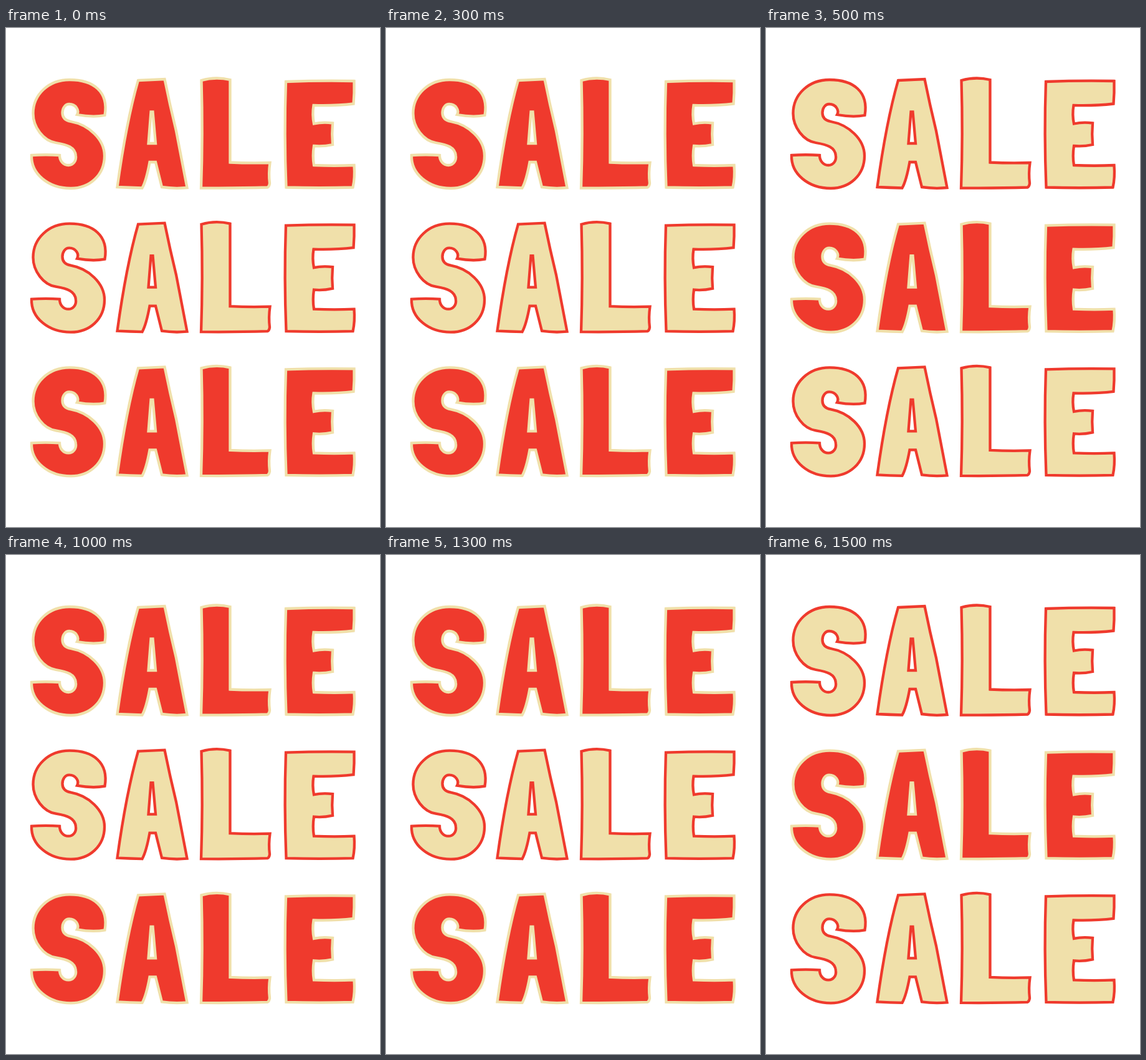
Write an HTML page with a canvas that moves like this. It is 600 px wide and 800 px high and loops after 2 s.

```html
<!DOCTYPE html>
<html lang="en">
<head>
<meta charset="utf-8">
<title>Sale</title>
<style>
  html, body { margin: 0; width: 100%; height: 100%; overflow: hidden; background: #fff; }
  canvas { display: block; }
</style>
</head>
<body>
<canvas id="stage" width="600" height="800" aria-label="SALE SALE SALE"></canvas>
<script>
const ctx = document.getElementById('stage').getContext('2d');
const RED = '#ef3a2d';
const CREAM = '#f0e0aa';
const ROWS = 3;
const ROW_STEP = 230.7;
const SWAP_MS = 500;

const letters = {
  S: 'M158.5 140Q139 143.500 114 139C118 132 112 122 101.500 122' +
     'C94.500 122 90.500 129 90.500 136C90.500 144 96 148.500 104 150' +
     'C132 155 158 178 158 205C158 236 134 257 104 257' +
     'C68 257 40 234 41 204Q64 202.500 86 204C86 213 92 220 100 220' +
     'C108 220 113 213 112 205C111 191 98 187 80 184' +
     'C60 181 43.500 159 43.500 137C43.500 107 68 83 102 83' +
     'C140 83 165 102 158.500 140Z',
  A: 'M212 84Q234 83 254.500 82Q263 124 273 165L290.500 256' +
     'Q270 258 250 255L240 215H230.500Q225 245 218.500 256.500' +
     'Q199 256 178.500 255Q193 150 212 84Z' +
     'M232.500 134.500H235.500L240 185H228.500Z',
  L: 'M313.500 84Q336 77.500 359.500 83V215.500Q392 217 423.500 216' +
     'Q421 233 423 249Q422.500 254 419.500 255.500Q370 257 313 256.500' +
     'Q316 170 313.500 84Z',
  E: 'M449 86Q504 84 558.500 85Q559 104 557.500 121.500' +
     'Q528 125 493.500 124Q491 139 494 153.500Q508 150.500 524 152.500' +
     'Q522.500 170 524 187Q508 190.500 494 189Q491.500 205 494 220' +
     'Q527 221.500 558.500 220Q560 240 556.500 255.500' +
     'Q503 257 449.500 255.500Q446 170 449 86Z'
};
const glyphs = Object.values(letters).map(d => new Path2D(d));

function drawWord(y, fill, outline) {
  ctx.save();
  ctx.translate(0, y);
  ctx.fillStyle = fill;
  ctx.strokeStyle = outline;
  for (const glyph of glyphs) {
    ctx.fill(glyph, 'evenodd');
    ctx.stroke(glyph);
  }
  ctx.restore();
}

function render(time) {
  const phase = Math.floor(time / SWAP_MS) % 2;
  ctx.fillStyle = '#fff';
  ctx.fillRect(0, 0, 600, 800);
  ctx.lineWidth = 4.3;
  ctx.lineJoin = 'miter';
  for (let row = 0; row < ROWS; row++) {
    const redFill = (row + phase) % 2 === 0;
    drawWord(row * ROW_STEP, redFill ? RED : CREAM, redFill ? CREAM : RED);
  }
}

const start = performance.now();
function tick() {
  render(performance.now() - start);
  requestAnimationFrame(tick);
}
tick();
</script>
</body>
</html>
```
